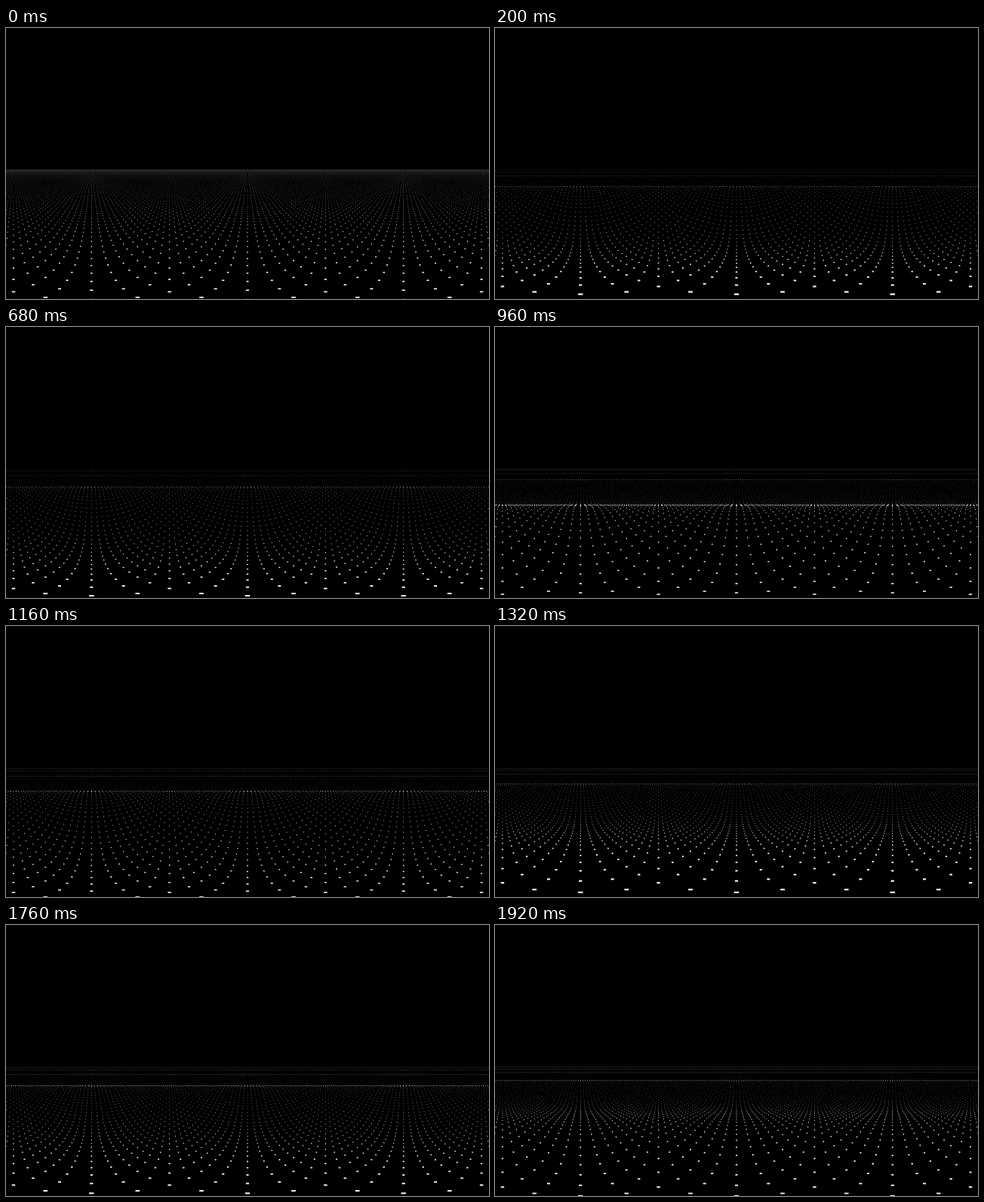
An HTML page with a canvas that plays this animation: 640 by 360 pixels, repeating every 1.96 s.

```html
<!DOCTYPE html>
<html>
<head>
<meta charset="utf-8">
<style>
html, body { margin: 0; width: 100%; height: 100%; overflow: hidden; background: #000; }
canvas { display: block; }
</style>
</head>
<body>
<canvas id="stage" width="640" height="360"></canvas>
<script>
const W = 640, H = 360, LOOP = 1960, SLOT = 40;
const SCALE = 131.6;   // pixels per radian in the panorama
const CAMERA = 10;     // height of the eye above the calm plane
const REACH = 165, TOP = 188, STEP = 0.05, K = 0.2;
const CUTOFF = 0.05;   // fainter light stays black

const ctx = document.getElementById('stage').getContext('2d');
const image = ctx.createImageData(W, H);
const light = new Float32Array(W * H);
const ridge = new Float32Array(REACH / STEP + 2);

// A square lattice of dots, seen all round from its centre.
const dots = [];
for (let i = -REACH; i <= REACH; i++) {
  for (let j = -REACH; j <= REACH; j++) {
    const r = Math.hypot(i, j);
    const x = W / 2 + SCALE * Math.atan2(i, j);
    if (r > 0 && r <= REACH && x > -5 && x < W + 5) dots.push({ x, r });
  }
}

// 24 steps a second shown in 40 ms slots: two steps are held for two slots.
function stepAt(ms) {
  const slot = Math.floor(ms / SLOT);
  return slot - (slot >= 1) - (slot >= 25);
}

function splat(x, y, w, h) {
  const x0 = x - w / 2, x1 = x + w / 2, y0 = y - h / 2, y1 = y + h / 2;
  for (let py = Math.floor(y0); py < y1; py++) {
    if (py < TOP || py >= H) continue;
    const cy = Math.min(y1, py + 1) - Math.max(y0, py);
    for (let px = Math.floor(x0); px < x1; px++) {
      if (px < 0 || px >= W) continue;
      light[py * W + px] += cy * (Math.min(x1, px + 1) - Math.max(x0, px));
    }
  }
}

function draw(step) {
  // Rings run outwards and fade with both time and distance.
  const amp = (1.45 + 4.2 * Math.exp(-step / 18)) * (1 - Math.exp(-step / 3));
  const phase = step * Math.PI * 4 / 25 - 2.5;
  const depth = r => CAMERA - amp * Math.exp(-r / 180) * Math.cos(K * r - phase);
  const screenY = (r, d) => H / 2 + SCALE * Math.atan(d / r);

  // Highest line reached so far, going outwards: it hides what lies behind.
  let top = Infinity;
  for (let n = 0; n < ridge.length; n++) {
    const r = (n + 0.01) * STEP;
    ridge[n] = top = Math.min(top, screenY(r, depth(r)));
  }

  light.fill(0);
  for (const { x, r } of dots) {
    const d = depth(r), y = screenY(r, d);
    if (y < H + 3 && y <= ridge[Math.floor(r / STEP)] + 0.1) {
      splat(x, y, 12.8 / r, 18 / Math.hypot(r, d));
    }
  }

  for (let n = 0; n < light.length; n++) {
    const level = Math.max(0, Math.min(1, light[n]) - CUTOFF) / (1 - CUTOFF);
    image.data.fill(level * 255, n * 4, n * 4 + 3);
    image.data[n * 4 + 3] = 255;
  }
  ctx.putImageData(image, 0, 0);
}

const start = performance.now();
let shown = -1;
function tick() {
  const step = stepAt((performance.now() - start) % LOOP);
  if (step !== shown) draw(shown = step);
  requestAnimationFrame(tick);
}
tick();
</script>
</body>
</html>
```
